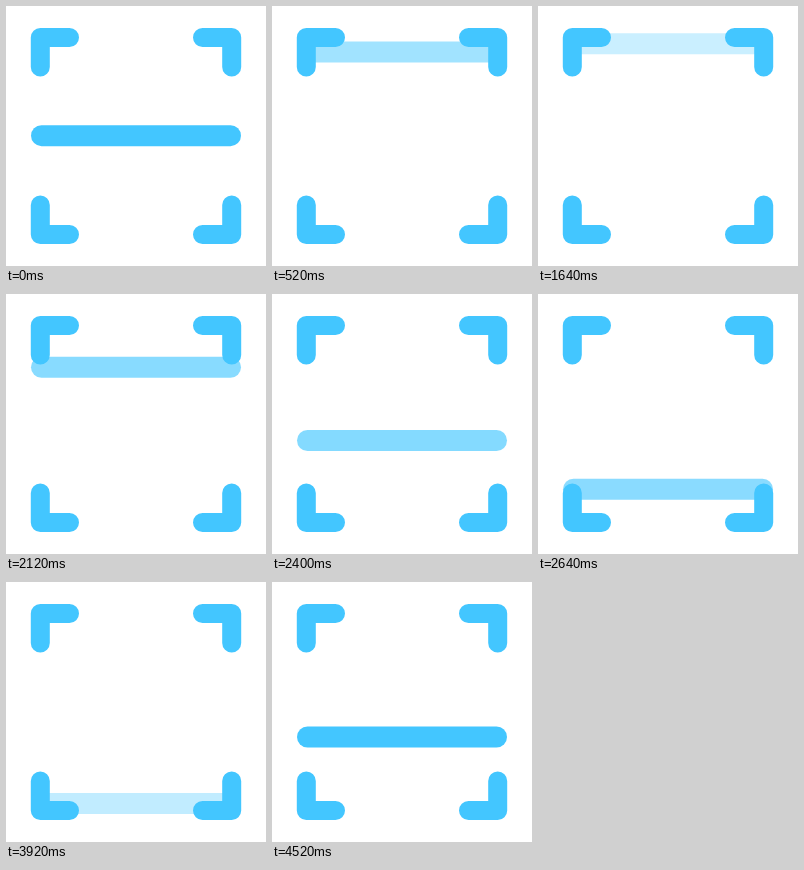
Animation of 260 by 260 pixels, one loop 4560 ms. Source, as an HTML page with a canvas:

```html
<!DOCTYPE html>
<html lang="en">
<head>
<meta charset="utf-8">
<title>Scanner</title>
<style>
html, body { margin: 0; width: 100%; height: 100%; overflow: hidden; background: #fff; }
canvas { display: block; width: 260px; height: 260px; }
</style>
</head>
<body>
<canvas id="stage" width="260" height="260"></canvas>
<script>
const ctx = document.getElementById('stage').getContext('2d');
const LOOP = 4560, BLUE = '#43c6ff', TOP = 32.5, BOTTOM = 227.5;

// Symmetric cubic-bezier(p, 0, 1 - p, 1), solved by bisection
function ease(x, p) {
  let lo = 0, hi = 1, s = 0.5;
  for (let i = 0; i < 24; i++) {
    s = (lo + hi) / 2;
    const r = 1 - s;
    const bx = 3 * r * r * s * p + 3 * r * s * s * (1 - p) + s * s * s;
    if (bx < x) lo = s; else hi = s;
  }
  return s * s * (3 - 2 * s);
}

// Keys are [time, value]
function track(keys, t, p) {
  let i = 0;
  while (i < keys.length - 2 && t >= keys[i + 1][0]) i++;
  const [t0, a] = keys[i], [t1, b] = keys[i + 1];
  const x = Math.min(1, Math.max(0, (t - t0) / (t1 - t0)));
  return a + (b - a) * ease(x, p);
}

const barY = [[-1140, BOTTOM], [1140, TOP], [1220, TOP], [3480, BOTTOM], [5720, TOP]];
const barAlpha = [[0, 1], [1040, 0], [1080, 0], [2280, 0.65], [2480, 0.65],
  [3440, 0], [3480, 0], [4560, 1]];

function stroke(width, points) {
  ctx.lineWidth = width;
  ctx.beginPath();
  for (const [x, y] of points) ctx.lineTo(x, y);
  ctx.stroke();
}

function draw(t) {
  ctx.fillStyle = '#fff';
  ctx.fillRect(0, 0, 260, 260);
  ctx.strokeStyle = BLUE;
  ctx.lineCap = ctx.lineJoin = 'round';

  const y = track(barY, t, 0.74);
  ctx.globalAlpha = track(barAlpha, t, 0.5);
  stroke(21, [[35.5, y], [224.5, y]]);
  ctx.globalAlpha = 1;

  for (const sx of [-1, 1]) {
    for (const sy of [-1, 1]) {
      const at = (x, y) => [130 + sx * x, 130 + sy * y];
      stroke(19, [at(66.5, 98.5), at(95.7, 98.5), at(95.7, 69)]);
    }
  }
}

function tick() {
  draw(performance.now() % LOOP);
  requestAnimationFrame(tick);
}
tick();
</script>
</body>
</html>
```
